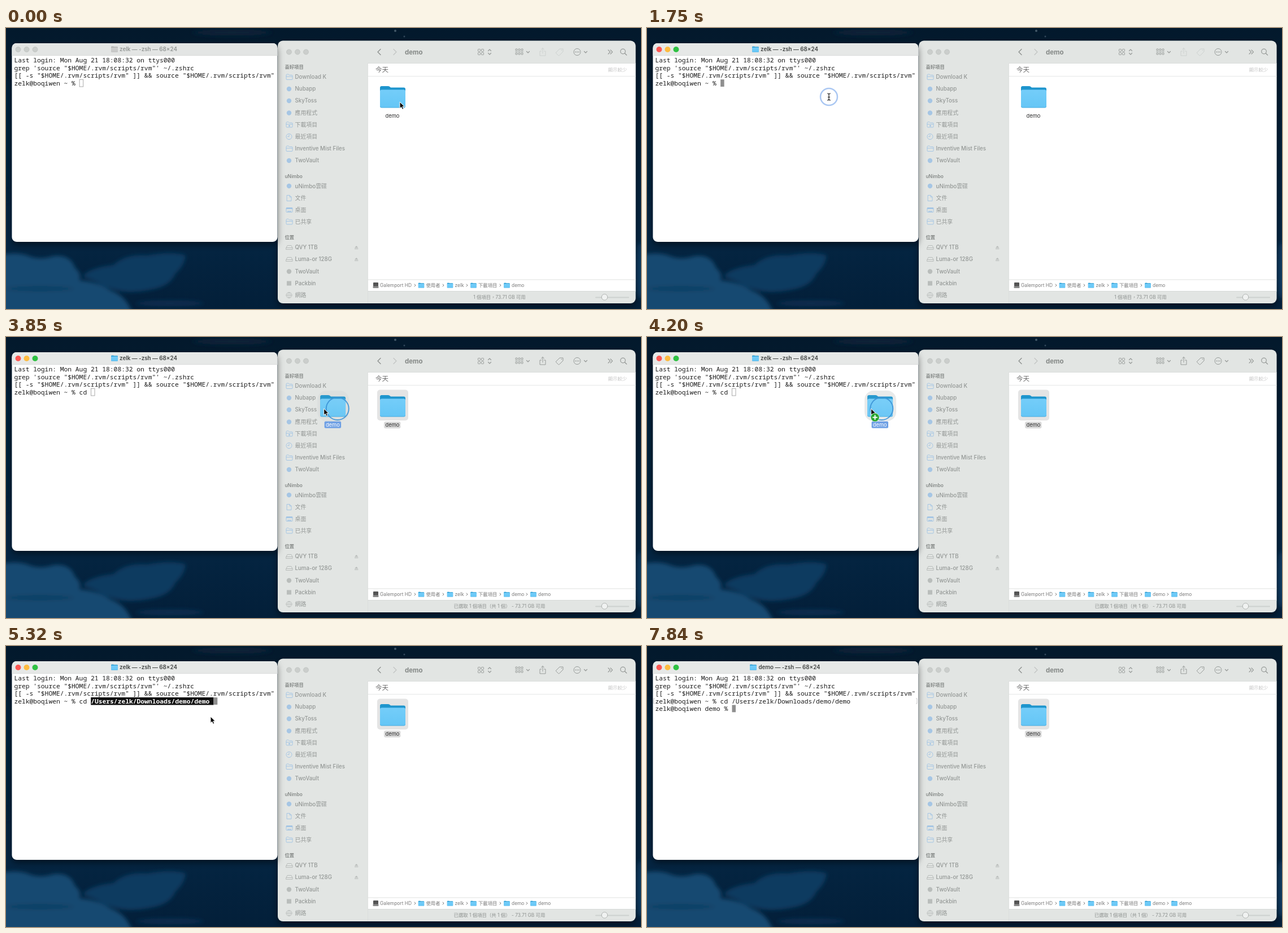
Recreate the animation shown at these times as an HTML page. Size 1124x498 px, loop 8 s.

```html
<!DOCTYPE html>
<html lang="zh-Hant">
<head>
<meta charset="utf-8">
<title>Drag a folder into the terminal</title>
<style>
html, body { margin: 0; width: 100%; height: 100%; overflow: hidden; background: #03162a; }
svg { display: block; width: 1124px; height: 498px; }
text { white-space: pre; font-family: Inter, "Noto Sans CJK TC", "Noto Sans CJK", sans-serif; }
.mono text { font-family: "Noto Sans Mono", "DejaVu Sans Mono", monospace; font-size: 11.317px; fill: #1c1c1c; }
.line { fill: none; stroke-linecap: round; stroke-linejoin: round; }
</style>
</head>
<body>
<svg id="stage" viewBox="0 0 1124 498"></svg>
<script>
const USER = 'zelk', HOST = 'boqiwen';
const PATH = `/Users/${USER}/Downloads/demo/demo`;
const COL = 6.79, ROW = 13.5, LEFT = 14.4, TOP = 57;
const LOOP = 8000;

// Key moments in ms
const CLICK = 1610, TYPE = [2060, 2200, 2350], PRESS = 3330, LIFT = 3560,
      DROP = 4550, ENTER = 6900;

// Pointer stops: time, x, y
const STOPS = [
  [0, 697, 131], [450, 697, 131], [1430, 322, 122], [2480, 322, 122],
  [3120, 672, 137], [3300, 669, 127], [3500, 669, 127], [4386, 362, 127],
  [4600, 362, 125], [5350, 362, 125], [5950, 381, 124], [LOOP, 381, 124]
];

const rect = (x, y, w, h, fill, r = 0, more = '') =>
  `<rect x="${x}" y="${y}" width="${w}" height="${h}" rx="${r}" fill="${fill}" ${more}/>`;
const disc = (x, y, r, fill, more = '') =>
  `<circle cx="${x}" cy="${y}" r="${r}" fill="${fill}" ${more}/>`;
const line = (d, color, w = 1, more = '') =>
  `<path class="line" d="${d}" stroke="${color}" stroke-width="${w}" ${more}/>`;
const label = (x, y, str, size, fill, weight = 400, anchor = 'start', more = '') =>
  `<text x="${x}" y="${y + size * 0.36}" font-size="${size}" fill="${fill}" font-weight="${weight}" text-anchor="${anchor}" ${more}>${str}</text>`;
const group = (id, body, more = '') => `<g id="${id}" ${more}>${body}</g>`;
const folder = (x, y, k = 1) => `<use href="#folder" transform="translate(${x} ${y}) scale(${k})"/>`;
const blob = (x, y, rx, ry, fill, o = 1) =>
  `<ellipse cx="${x}" cy="${y}" rx="${rx}" ry="${ry}" fill="${fill}" opacity="${o}"/>`;
const esc = s => s.replace(/&/g, '&amp;');
const row = (n, str, col = 0, more = '') =>
  `<text x="${LEFT + col * COL}" y="${TOP + n * ROW + 4}" ${more}>${esc(str)}</text>`;

const defs = `<defs>
  <linearGradient id="sky" x2="0" y2="1">
    <stop offset="0" stop-color="#03192c"/><stop offset=".75" stop-color="#042542"/><stop offset="1" stop-color="#031f39"/>
  </linearGradient>
  <linearGradient id="front" x2="0" y2="1">
    <stop offset="0" stop-color="#74cdf9"/><stop offset="1" stop-color="#65c6f6"/>
  </linearGradient>
  <filter id="soft" x="-30%" y="-30%" width="160%" height="160%"><feGaussianBlur stdDeviation="3.5"/></filter>
  <filter id="shade" x="-10%" y="-10%" width="120%" height="125%"><feDropShadow dx="0" dy="5" stdDeviation="6" flood-color="#000" flood-opacity=".5"/></filter>
  <g id="folder">
    <path d="M-22.500-15.500q0-3 3-3h11q2 0 3.500 1.300l1.500 1.200h23q3 0 3 3v8h-45z" fill="#1e95cd"/>
    <rect x="-22.500" y="-12" width="45" height="32" rx="3" fill="#45abe0"/>
    <rect x="-22.500" y="-12" width="45" height="31" rx="3" fill="url(#front)"/>
  </g>
  <clipPath id="finderClip"><rect x="481" y="22.500" width="633.500" height="465.500" rx="9"/></clipPath>
</defs>`;

function sky() {
  const lit = '#174a71', mid = '#0e3b60';
  return rect(0, 0, 1124, 498, 'url(#sky)') + `<g filter="url(#soft)">` +
    blob(400, 8, 70, 6, '#072238') + blob(1122, 430, 8, 50, mid) + blob(2, 200, 8, 110, '#05203a') +
    `<path d="M135 440q15-16 55-20q22-20 60-17q45-8 68 0q-2 18-18 32q-10 25-50 30q-50 10-90-15z" fill="${mid}"/>` +
    `<path d="M-10 402q30-6 50 2q20 8 45 0q30-2 37 21q13 10 8 22q35 3 55 18q30 10 40 45h-235z" fill="${lit}"/>` +
    blob(60, 462, 60, 5, mid, .7) + blob(290, 488, 60, 6, mid, .5) + `</g>` +
    disc(689, 5, 2, '#5d7280', 'opacity=".7"') + disc(705, 15, 1.500, '#51687a', 'opacity=".6"');
}

const BLUE = '#a6c6e4', GREY = '#b9bdbb', INK = '#939795';
const icons = {
  folder: (y, c) => line(`M496 ${y - 3.500}q0-1.500 1.500-1.500h2.500l1.500 1.500h4.500q1 0 1 1v6q0 1-1 1h-9q-1 0-1-1zM496 ${y - 1}h11`, c),
  mark: (y, c) => disc(501, y, 4.200, c),
  box: (y, c) => rect(497, y - 4, 8, 8, c),
  load: (y, c) => icons.folder(y, c) + disc(501.500, y + 1.800, 1.500, c),
  clock: (y, c) => disc(501, y, 5, 'none', `stroke="${c}"`) + line(`M501 ${y - 3}v3h-2.500`, c),
  doc: (y, c) => line(`M497.500 ${y - 5}h4.500l3 3v7h-7.500zM502 ${y - 5}v3h3`, c),
  desk: (y, c) => rect(496, y - 4, 11, 8, 'none', 1, `stroke="${c}"`) + rect(496, y - 4, 11, 2.500, c) + rect(498, y + 1.500, 7, 1.500, c),
  drive: (y, c) => line(`M496 ${y + .5}l2-4h7l2 4v3h-11zM496 ${y + .5}h11`, c),
  globe: (y, c) => disc(501, y, 5, 'none', `stroke="${c}"`) + line(`M496 ${y}h10M501 ${y - 5}q-4.500 5 0 10q4.500-5 0-10`, c, .8)
};

const SIDE = [
  [69.500, '喜好項目'],
  [87, 'Download K', 'folder'], [108, 'Nubapp', 'mark'], [129, 'SkyToss', 'mark'],
  [150.500, '應用程式', 'mark'], [171.500, '下載項目', 'load'], [192.500, '最近項目', 'clock'],
  [214, 'Inventive Mist Files', 'folder'], [235, 'TwoVault', 'mark'],
  [263, 'uNimbo'],
  [280, 'uNimbo雲碟', 'mark'], [301.500, '文件', 'doc'], [322.500, '桌面', 'desk'], [343.500, '已共享', 'folder'],
  [371, '位置'],
  [389, 'QVY 1TB', 'drive', 1], [410, 'Luma-or 128G', 'drive', 1], [431.500, 'TwoVault', 'mark'],
  [452.500, 'Packbin', 'box'], [473.500, '網路', 'globe']
];

function sidebar() {
  return SIDE.map(([y, name, icon, eject]) => {
    if (!icon) return label(493.500, y, name, 8.300, '#868a88', 600);
    const size = /^[\x00-\x7f]+$/.test(name) ? 9.700 : 9.900;
    return icons[icon](y, y < 371 ? BLUE : GREY) + label(511.500, y, name, size, INK, 500) +
      (eject ? `<path d="M617 ${y + .5}l3.200-3.500 3.200 3.500z" fill="${GREY}"/>` + rect(617, y + 1.700, 6.400, 1.200, GREY) : '');
  }).join('');
}

const share = c => line('M947.500 41h-2.500v8h10v-8h-2.500M950 45v-9.500M947.500 38l2.500-2.500 2.500 2.500', c);
const tag = c => line('M973.500 43.500l6.500-6.500h6v5l-6.500 6.500q-1 1-2 0l-4-4q-.6-.5 0-1z', c) + disc(983.500, 39.500, .8, c);

function toolbar() {
  const c = '#979b99';
  let s = line('M663 37.500l-5 5 5 5', '#8b8f8d', 1.300) + line('M686 37.500l5 5-5 5', '#c2c6c4', 1.300) +
    label(706, 42.500, 'demo', 11.500, '#858987', 700);
  for (const x of [835.500, 841.500]) for (const y of [37.500, 43.500]) s += rect(x, y, 4, 4, 'none', .8, `stroke="${c}"`);
  for (const x of [902, 907, 912]) s += rect(x, 37, 3, 3, 'none', .5, `stroke="${c}"`) + rect(x, 44, 3, 3, 'none', .5, `stroke="${c}"`);
  s += line('M901.500 42h14', c, .7) +
    line('M853.500 40.500l2.500-2.500 2.500 2.500M853.500 44.500l2.500 2.500 2.500-2.500M921.500 41.500l2.500 2.500 2.500-2.500M1023.500 41.500l2.500 2.500 2.500-2.500', c, 1.200) +
    disc(1011, 42.500, 6, 'none', `stroke="${c}"`) + [1008, 1011, 1014].map(x => disc(x, 42.500, .9, c)).join('') +
    line('M1066 39l3.500 3.500-3.500 3.500M1070 39l3.500 3.500-3.500 3.500', c, 1.200) +
    disc(1092, 41.500, 4.300, 'none', `stroke="${c}" stroke-width="1.200"`) + line('M1095.200 44.700l3.300 3.300', c, 1.400);
  return s + group('toolsOff', share('#cdd1cf') + tag('#cdd1cf')) + group('toolsOn', share(c) + tag(c));
}

const chev = x => line(`M${x - 1} 454l2 2-2 2`, '#777');
const crumb = (x, name, next) =>
  folder(x, 456, .23) + label(x + 8.500, 456, name, 8.400, '#7a7a7a') + (next ? chev(next) : '');

function finder() {
  const panel = '#e2e5e3';
  return rect(481, 22.500, 633.500, 465.500, panel, 9, 'filter="url(#shade)"') + `<g clip-path="url(#finderClip)">` +
    rect(640.500, 62.500, 474, 404, '#fff') +
    rect(640, 62, 475, .8, '#d6d9d7') + rect(640, 85, 475, 1, '#e6e8e7') +
    rect(640, 445.500, 475, 1, '#dfe1e0') + rect(640, 466, 475, 1, '#d6d9d7') + rect(640, 62, .8, 426, '#dadddb') +
    [501, 516, 531].map(x => disc(x, 42.500, 4.500, '#cbcecc', 'stroke="#bcc0be" stroke-width=".7"')).join('') +
    sidebar() + toolbar() +
    label(654, 74, '今天', 11.500, '#6a6a6a', 500) + label(1099, 74, '顯示較少', 8.300, '#c6c6c6', 400, 'end') +
    group('picked', rect(657, 93.500, 55, 54.500, '#e4e4e4', 5) + rect(669, 150, 29.500, 12, '#dadada', 3)) +
    folder(684.500, 121.500) + label(684, 156, 'demo', 9.300, '#2b2b2b', 400, 'middle') +
    rect(650, 451, 9, 7, '#555', 1) + rect(649.500, 457.500, 10, 3.500, '#8a8a8a', 1) +
    label(662, 456, 'Galemport HD', 8.400, '#7a7a7a') + chev(724) +
    crumb(735, '使用者', 774) + crumb(786, USER, 816) + crumb(827.500, '下載項目', 875) + crumb(886.500, 'demo') +
    group('lastCrumb', chev(922) + crumb(933.500, 'demo')) +
    label(873.500, 477, '', 8.400, '#8d918f', 400, 'middle', 'id="status"') +
    rect(1043, 476.500, 60, 2, '#cdd1cf', 1) + disc(1059.500, 477, 5.300, '#f0f2f1', 'stroke="#afb3b1"') + `</g>`;
}

function terminal() {
  return rect(10.500, 27, 470, 352, '#fff', 8.500, 'filter="url(#shade)"') +
    `<path id="bar" d="M10.500 49v-13.500q0-8.500 8.500-8.500h453q8.500 0 8.500 8.500v13.500z"/>` + rect(10.500, 48.500, 470, .7, '#d3d6d4') +
    group('lampsOff', [21.500, 36.500, 51.500].map(x => disc(x, 38, 4.500, '#cbcecc', 'stroke="#b9bdbb" stroke-width=".7"')).join('')) +
    group('lampsOn', ['#fc5753', '#fdbc40', '#2fc143'].map((c, i) => disc(21.500 + 15 * i, 38, 5, c)).join('')) +
    group('titleIcon', folder(0, 0, .26)) + label(252, 37.500, '', 9.800, '#444', 600, 'middle', 'id="title"') +
    `<g class="mono">` +
    row(0, 'Last login: Mon Aug 21 18:08:32 on ttys000') +
    row(1, `grep 'source "$HOME/.rvm/scripts/rvm"' ~/.zshrc`) +
    row(2, '[[ -s "$HOME/.rvm/scripts/rvm" ]] && source "$HOME/.rvm/scripts/rvm"') +
    row(3, '', 0, 'id="prompt"') +
    group('chosen', rect(LEFT + 20 * COL, 91, 32 * COL, ROW, '#111') + row(3, PATH, 20, 'style="fill:#fff;font-weight:700"')) +
    group('next', row(4, `${USER}@${HOST} demo %`) + line('M13.500 93h-1.500v9h1.500M476.500 93h1.500v9h-1.500', '#bbb', .8)) + `</g>` +
    rect(0, 0, 6.500, 12.800, '#8f8f8f', 0, 'id="caret" stroke-width="1"');
}

const pointer =
  group('ghost', rect(385.500, 95, 56, 54, '#d9dcdd', 16, 'opacity=".6"') + `<g opacity=".95">${folder(413, 121.500)}</g>` +
    rect(398, 149.500, 29.500, 12, '#6fa0e4', 2) + label(412.700, 155.500, 'demo', 9.300, '#fff', 400, 'middle')) +
  `<circle id="ring" fill="none" stroke="#3b93d6"/>` +
  group('arrow', `<path d="M0 0v11.500l2.700-2.400 1.900 4.200 2.200-1-1.900-4.100h3.600z" fill="#0a0a0a" stroke="#fff" stroke-width="1"/>` +
    group('plus', disc(7, 15.500, 7.500, '#27a52f', 'stroke="#e8f5e8" stroke-width=".7"') + line('M3.500 15.500h7M7 12v7', '#fff', 2))) +
  group('beam', line('M-2.500-6q2.500 0 2.500 2v8q0 2-2.500 2M2.500-6q-2.500 0-2.500 2v8q0 2 2.500 2M-1.500.500h3', '#222', 1.200));

const stage = document.getElementById('stage');
stage.innerHTML = defs + sky() + finder() + terminal() + pointer;
const $ = id => document.getElementById(id);
const show = (id, on) => $(id).style.display = on ? '' : 'none';
const set = (id, attrs) => { for (const k in attrs) $(id).setAttribute(k, attrs[k]); };
const move = (id, x, y) => set(id, { transform: `translate(${x} ${y})` });

function pointerAt(t) {
  const i = Math.max(1, STOPS.findIndex(s => s[0] >= t));
  const [t0, x0, y0] = STOPS[i - 1], [t1, x1, y1] = STOPS[i];
  const u = Math.max(0, (t - t0) / (t1 - t0)), e = u * u * (3 - 2 * u);
  return [x0 + (x1 - x0) * e, y0 + (y1 - y0) * e];
}

// The ring trails the pointer a little
function drawRing(t) {
  const held = t >= PRESS && t < DROP, age = t - (t < PRESS ? CLICK : DROP);
  const on = held || (age >= 0 && age < 260);
  show('ring', on);
  if (!on) return;
  const [x, y] = pointerAt(t - 50);
  set('ring', held
    ? { cx: x, cy: y, r: 20 - 5 * Math.max(0, 1 - (t - PRESS) / 150), opacity: .9, 'stroke-width': 2, stroke: '#3b93d6' }
    : { cx: x, cy: y, r: 20 - age / 28, opacity: 1 - age / 260 * .9, 'stroke-width': 2.500, stroke: '#5b93e6' });
}

function draw(t) {
  const active = t >= CLICK, picked = t >= PRESS, done = t >= ENTER;
  const dropped = t >= DROP, drag = t >= LIFT && !dropped;
  const typed = TYPE.filter(k => t >= k).length;
  const [x, y] = pointerAt(t);
  const over = x < 480;

  show('lampsOn', active);
  show('lampsOff', !active);
  set('bar', { fill: active ? '#e6e8e7' : '#e3e5e4' });
  set('title', { fill: active ? '#414443' : '#939795' });
  $('title').textContent = `${done ? 'demo' : USER} — -zsh — 68×24`;
  move('titleIcon', done ? 188 : 192, 37.500);
  $('titleIcon').style.filter = active ? '' : 'grayscale(1) opacity(.6)';

  $('prompt').textContent = `${USER}@${HOST} ~ % ` + 'cd '.slice(0, typed) + (done ? PATH : '');
  show('chosen', dropped && !done);
  show('next', done);
  const col = done ? 20 : 17 + typed + (dropped ? 32 : 0);
  const hollow = !active || (picked && !dropped);
  set('caret', {
    x: LEFT + col * COL + .3, y: done ? 104.500 : 91.200,
    fill: hollow ? 'none' : '#8f8f8f', stroke: hollow ? '#aaa' : 'none'
  });

  for (const id of ['picked', 'toolsOn', 'lastCrumb']) show(id, picked);
  show('toolsOff', !picked);
  const free = `${done ? '73.72' : '73.71'} GB 可用`;
  $('status').textContent = picked ? `已選取 1 個項目（共 1 個） - ${free}` : `1 個項目，${free}`;

  const typing = (t >= TYPE[0] && t < 2500) || done;
  const beam = over && active && !picked;
  show('arrow', !typing && !beam);
  show('beam', !typing && beam);
  show('plus', drag && over);
  show('ghost', drag);
  move('arrow', x, y);
  move('beam', x, y);
  move('ghost', x - 397, y - 127);
  drawRing(t);
}

function tick() {
  draw(performance.now() % LOOP);
  requestAnimationFrame(tick);
}
tick();
</script>
</body>
</html>
```
